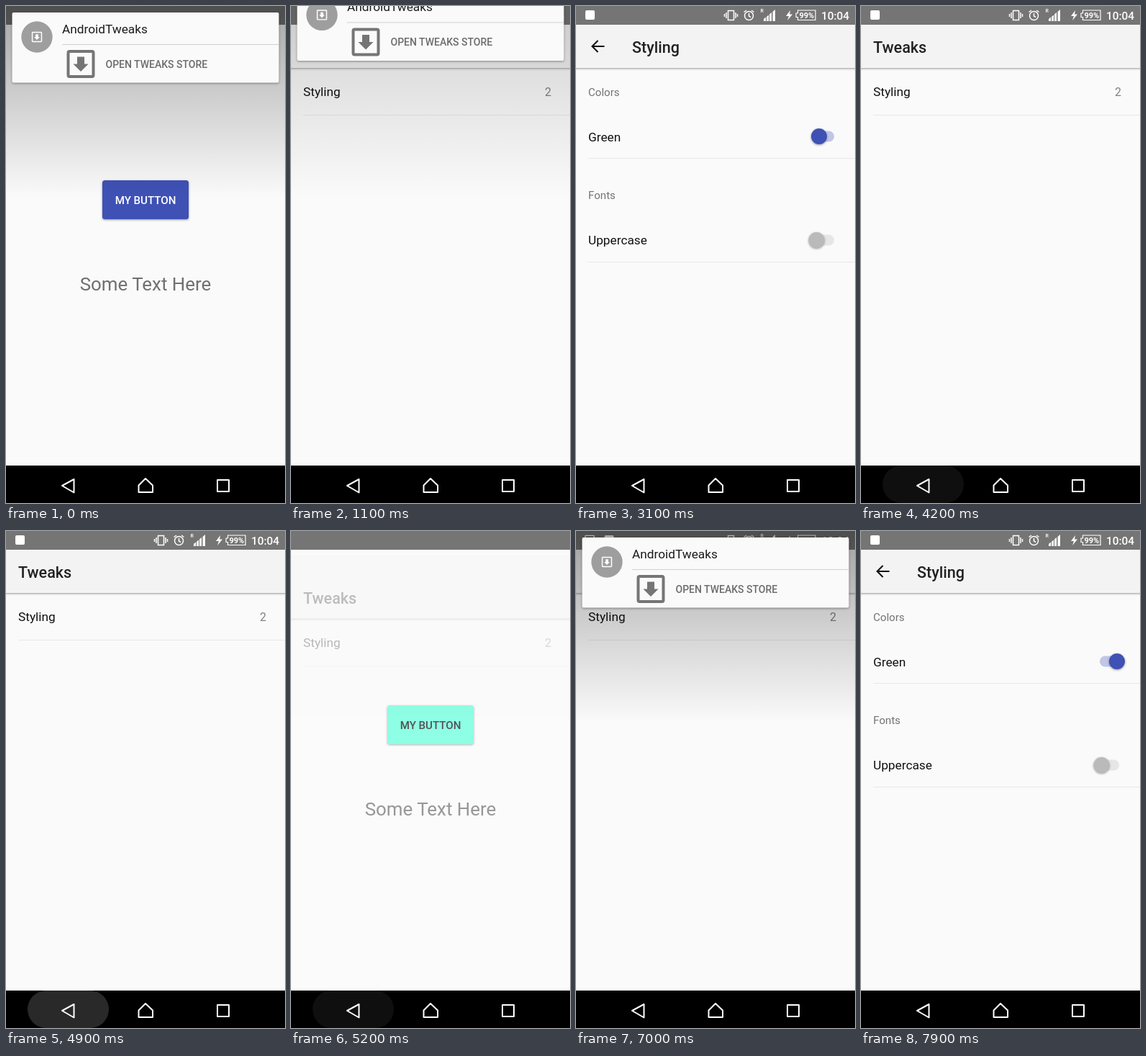
These frames come from a looping animation (388 by 690 pixels, 8000 ms). An HTML page:

```html
<!DOCTYPE html>
<html lang="en">
<head>
<meta charset="utf-8">
<title>Tweaks demo</title>
<style>
  html, body { margin: 0; width: 100%; height: 100%; overflow: hidden; background: #000; }
  svg { display: block; width: 100%; height: 100%; }
  text { font: 17.25px Roboto, sans-serif; fill: #111; }
  .medium { font-weight: 500; }
  .title { font-size: 21.56px; font-weight: 500; fill: #212121; }
  .label { font-size: 15.1px; fill: #737373; }
  .page { fill: #fafafa; }
  .bar { fill: #f3f3f3; filter: drop-shadow(0 1px 1.5px rgba(0,0,0,.4)); }
  .rule { stroke: #e8e8e8; }
  .raised { filter: drop-shadow(0 1px 1.5px rgba(0,0,0,.4)); }
  .white { fill: #fff; }
  .line { fill: none; stroke: #fff; stroke-width: 1.5; }
  .nav { fill: none; stroke: #fff; stroke-width: 2; stroke-linejoin: round; }
</style>
</head>
<body>
<svg viewBox="0 0 388 690">
  <defs>
    <linearGradient id="shade" x2="0" y2="1">
      <stop stop-opacity=".333"/>
      <stop offset="1" stop-opacity="0"/>
    </linearGradient>
    <g id="download">
      <rect x="-17.5" y="-17.5" width="35" height="35" rx="2" fill="none" stroke="currentColor" stroke-width="4"/>
      <path d="M-5-10H5V0H10.500L0 10.500L-10.500 0H-5Z" fill="currentColor"/>
    </g>
  </defs>

  <g id="main">
    <rect class="page" width="388" height="690"/>
    <rect id="button" class="raised" x="134" y="242" width="120" height="54" rx="3.5"/>
    <text id="caption" class="medium" x="194" y="275" text-anchor="middle" style="font-size:15.1px">MY BUTTON</text>
    <text x="194" y="395" text-anchor="middle" style="font-size:25.9px;fill:#707070">Some Text Here</text>
  </g>

  <g id="list">
    <rect class="page" width="388" height="690"/>
    <rect class="bar" x="-5" width="398" height="86"/>
    <text class="title" x="17" y="65">Tweaks</text>
    <text x="17" y="125">Styling</text>
    <text x="362" y="125" text-anchor="end" style="font-size:16px;fill:#808080">2</text>
    <path class="rule" d="M17 151.500H388"/>
  </g>

  <g id="styling">
    <rect class="page" width="388" height="690"/>
    <rect class="bar" x="-5" width="398" height="86"/>
    <path d="M39.500 56H23M30.500 48L22.500 56L30.500 64" fill="none" stroke="#111" stroke-width="2.1"/>
    <text class="title" x="78" y="65">Styling</text>
    <text class="label" x="17" y="125">Colors</text>
    <text x="17" y="188">Green</text>
    <text class="label" x="17" y="268">Fonts</text>
    <text x="17" y="331">Uppercase</text>
    <path class="rule" d="M17 211.500H388M17 355.500H388"/>
    <rect id="track" x="332" y="173.500" width="27" height="15" rx="7.500"/>
    <circle id="thumb" class="raised" cy="181" r="11"/>
    <rect x="332" y="317.500" width="27" height="15" rx="7.500" fill="#e6e6e6"/>
    <circle class="raised" cx="334.500" cy="325" r="11" fill="#bababa"/>
  </g>

  <rect width="388" height="26" fill="#757575"/>
  <g id="status">
    <use id="notice" href="#download" color="#fff" transform="translate(19 12.500) scale(.35)"/>
    <rect id="badge" class="white" y="6" width="13" height="13" rx="2"/>
    <path class="line" d="M211.500 6.500H219.500V19.500H211.500ZM209 9V17M222 9V17M206.500 11V15M224.500 11V15"/>
    <circle class="line" cx="240.500" cy="13.500" r="6"/>
    <path class="line" d="M240.500 10V14L243 15.500M233.500 8.500L237 6M247.500 8.500L244 6"/>
    <text class="white medium" x="256.500" y="8.500" style="font-size:7px">R</text>
    <path class="white" d="M261 21V18L264 15.500V21ZM265 21V15L268 12.500V21ZM269 21V11.500L272 9V21ZM273.500 21V8L277 5V21Z"/>
    <path class="white" d="M298 6L292 14H296L294 20L301 11.500H297Z"/>
    <path class="line" style="stroke-width:1.200" d="M308.500 6H333V19.500H308.500V15.500H306V10H308.500Z"/>
    <text class="white" x="320.800" y="17" text-anchor="middle" style="font-size:11px;font-weight:700">99%</text>
    <text class="white medium" x="341" y="19" style="font-size:15.4px">10:04</text>
  </g>

  <rect id="scrim" width="388" height="266" fill="url(#shade)"/>

  <g id="notification">
    <rect class="raised" x="8.500" y="9" width="371" height="97.500" rx="2" fill="#fafafa"/>
    <circle cx="43" cy="43" r="21.700" fill="#9e9e9e"/>
    <use href="#download" color="#fff" transform="translate(43 43) scale(.37)"/>
    <text x="78" y="38" style="fill:#1c1c1c">AndroidTweaks</text>
    <path d="M78 53.500H379.500" stroke="#d0d0d0"/>
    <use href="#download" color="#757575" transform="translate(104 80.500)"/>
    <text class="medium" x="138.500" y="86" style="font-size:14px;fill:#6c6c6c">OPEN TWEAKS STORE</text>
  </g>

  <rect y="638" width="388" height="52"/>
  <rect id="press" x="30" y="638" width="113" height="52" rx="26" fill="#292929"/>
  <path class="nav" d="M78 666L94.500 657V675.500ZM194 656L204 665.500V675H184.500V665.500ZM294 658H310V674H294Z"/>
</svg>

<script>
  const LOOP = 8000;
  const el = id => document.getElementById(id);
  const set = (id, attrs) => {
    for (const name in attrs) el(id).setAttribute(name, attrs[name]);
  };
  const ramp = (t, from, to) => Math.min(1, Math.max(0, (t - from) / (to - from)));
  const smooth = p => p * p * (3 - 2 * p);
  const decelerate = p => 1 - (1 - p) ** 2;

  // Each visit is [open start, open end, close start, close end].
  const LIST_VISITS = [[480, 800, 5000, 5250], [6370, 6700, 9000, 9250]];
  const STYLING_VISITS = [[1930, 2200, 3950, 4200], [7630, 7890, 9000, 9250]];
  const BACK_PRESSES = [3600, 4600];

  function showScreen(id, visits, t) {
    const visit = visits.find(v => t >= v[0] && t < v[3]);
    if (!visit) return set(id, { display: 'none' });
    const [openStart, openEnd, closeStart, closeEnd] = visit;
    const opened = ramp(t, openStart, openEnd);
    const closed = ramp(t, closeStart, closeEnd);
    const shift = 55 * ((1 - opened) ** 3 + closed ** 2);
    set(id, {
      display: 'inline',
      opacity: decelerate(opened) * (1 - ramp(closed, .3, 1)),
      transform: `translate(0 ${shift})`
    });
  }

  function drawNotification(t) {
    const arriving = ramp(t, 5200, 5500);
    const leaveStart = t < 5200 ? 1000 : 7000;
    const hidden = t >= 5200 && t < 5500
      ? (1 - arriving) ** 2
      : smooth(ramp(t, leaveStart, leaveStart + 300));
    const shade = t >= 5200 && t < 5500
      ? arriving
      : 1 - ramp(t, leaveStart, leaveStart + 200);
    const leaving = t >= leaveStart && t < leaveStart + 300;
    const iconsShown = t >= leaveStart && t < 5200 || t >= 7000;

    set('notification', { transform: `translate(0 ${-116 * hidden})` });
    set('scrim', { opacity: shade });
    set('status', { opacity: iconsShown ? 1 : 0 });
    set('notice', { display: leaving ? 'inline' : 'none' });
    set('badge', { x: leaving ? 39.5 : 13 });
  }

  function drawSwitch(t) {
    const on = t >= 3035;
    const slide = (1 - Math.cos(Math.PI * ramp(t, 3035, 3285))) / 2;
    set('thumb', { cx: 334.5 + 21.5 * slide, fill: on ? '#3f51b5' : '#bababa' });
    set('track', { fill: on ? '#c1c5e7' : '#e6e6e6' });
    set('button', { fill: on ? '#64ffda' : '#3f51b5' });
    el('caption').style.fill = on ? '#111' : '#fff';
  }

  function drawBackPress(t) {
    const start = BACK_PRESSES.find(s => t >= s && t < s + 800) ?? -LOOP;
    const grow = decelerate(ramp(t, start, start + 250));
    const width = 52 + 61 * grow;
    set('press', {
      x: 86.5 - width / 2,
      width,
      opacity: grow * (1 - ramp(t, start + 350, start + 750))
    });
  }

  function draw(now) {
    const t = now % LOOP;
    showScreen('list', LIST_VISITS, t);
    showScreen('styling', STYLING_VISITS, t);
    drawNotification(t);
    drawSwitch(t);
    drawBackPress(t);
    requestAnimationFrame(draw);
  }

  draw(performance.now());
</script>
</body>
</html>
```
